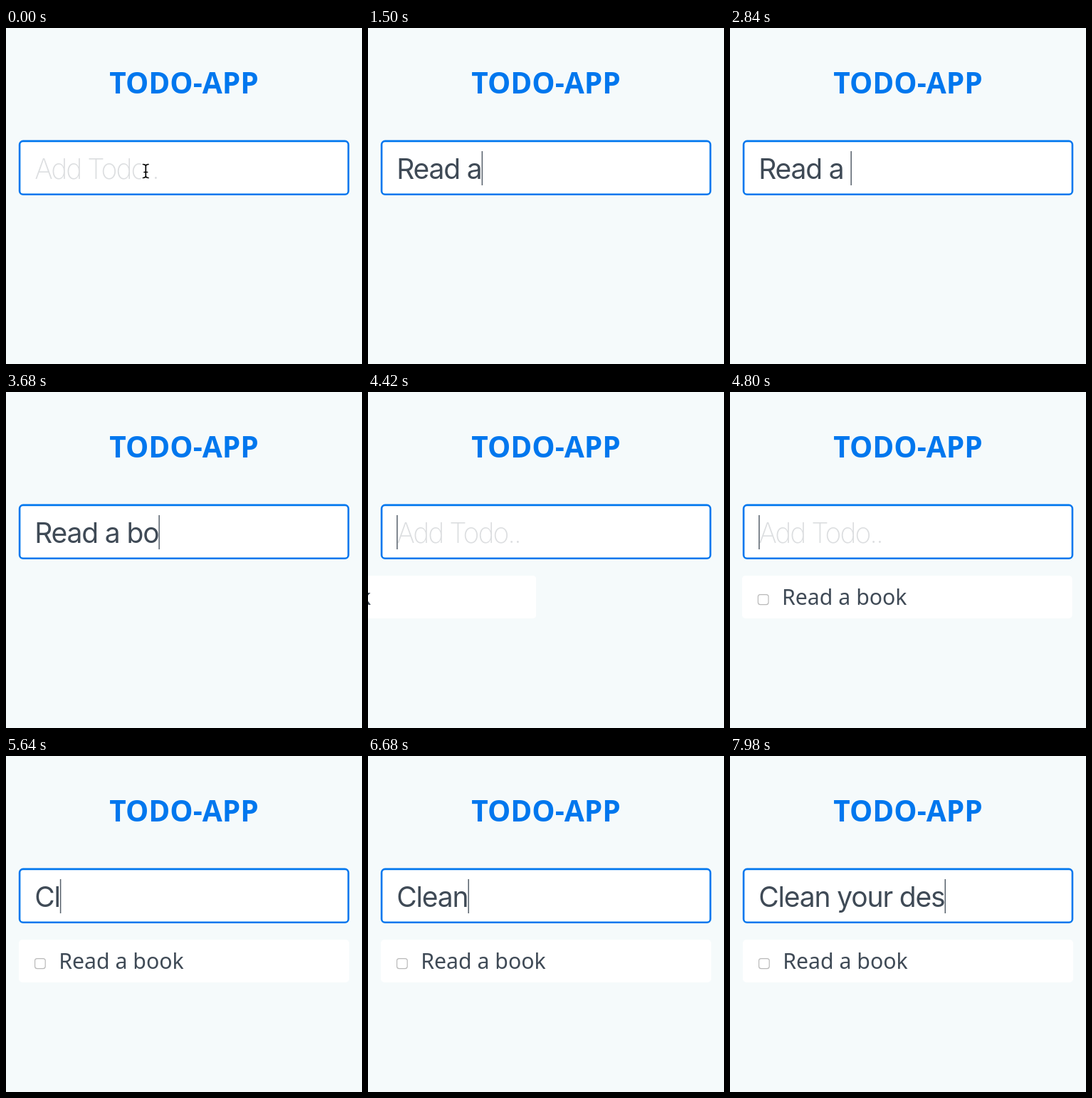
Write an HTML page that moves like this. It is 500x472 px and loops after 8000 ms.

```html
<!DOCTYPE html>
<html lang="en">
<head>
<meta charset="utf-8">
<title>Todo app</title>
<style>
  html, body { margin: 0; width: 100%; height: 100%; overflow: hidden; background: #f5fafb; }
  svg { display: block; width: 500px; height: 472px; }
  .title { font: 700 40.6px "Noto Sans", "Open Sans", sans-serif; fill: #0077ee; text-anchor: middle; }
  .field { fill: #fff; stroke: #0077ee; stroke-width: 2.6; }
  .entry { font: 400 39px Inter, "Liberation Sans", sans-serif; font-optical-sizing: none; }
  #typed { fill: #3f4a56; letter-spacing: -1.15px; }
  #hint { fill: #dcdee0; font-weight: 150; letter-spacing: -2.05px; }
  #caret { fill: #56606b; }
  .label { font: 400 30.25px "Noto Sans", "Open Sans", sans-serif; fill: #3f4a56; }
  .box { fill: #fff; stroke: #b9b9b9; stroke-width: 1.2; }
  .card { animation: slide 8s infinite; }
  .pointer { fill: none; stroke-linecap: round; animation: hide 8s step-end infinite; }
  .halo { stroke: #fff; stroke-width: 6; }
  .beam { stroke: #000; stroke-width: 1.7; }
  @keyframes slide {
    0%, 53% { transform: translateX(-508px); animation-timing-function: ease; }
    60.5%, 100% { transform: translateX(0); }
  }
  @keyframes hide {
    0% { opacity: 1; }
    .75%, 100% { opacity: 0; }
  }
</style>
</head>
<body>
<svg viewBox="0 0 500 472">
  <defs>
    <path id="ibeam" d="M192.5 191.5Q196 191.5 196.3 194Q196.6 191.5 200 191.5M196.3 194V208M192.5 210.5Q196 210.5 196.3 208Q196.6 210.5 200 210.5M194 202.5H198.6"/>
  </defs>
  <text class="title" x="250" y="91.9">TODO-APP</text>
  <rect class="field" x="19.1" y="158.9" width="461.8" height="74.8" rx="4.8"/>
  <text class="entry" id="hint" x="40.2" y="212">Add Todo..</text>
  <text class="entry" id="typed" x="40.2" y="212"></text>
  <rect id="caret" x="40.2" y="173" width="1.5" height="48"/>
  <g class="pointer">
    <use href="#ibeam" class="halo"/>
    <use href="#ibeam" class="beam"/>
  </g>
  <g class="card">
    <rect x="18" y="258" width="464" height="60" rx="5" fill="#fff"/>
    <rect class="box" x="40.6" y="284.6" width="14.6" height="14" rx="3"/>
    <text class="label" x="74.2" y="298.8">Read a book</text>
  </g>
</svg>
<script>
  const LOOP = 8000, ENTER = 4240, LEFT = 40.2;
  const first = {
    text: 'Read a book',
    keys: [360, 520, 680, 920, 1160, 1260, 2540, 3400, 3560, 3720, 3860]
  };
  const second = {
    text: 'Clean your des',
    keys: [5320, 5640, 6000, 6360, 6680, 6860, 7160, 7260, 7360, 7460, 7560, 7680, 7800, 7940]
  };
  const caretOff = [[0, 360], [1740, 2240], [3080, 3400]];

  const [hint, typed, caret] = ['hint', 'typed', 'caret'].map(id => document.getElementById(id));
  const start = performance.now();

  function draw() {
    const t = (performance.now() - start) % LOOP;
    const { text, keys } = t < ENTER ? first : second;
    const count = keys.filter(k => k <= t).length;
    // Hard spaces keep a trailing space in the measured width.
    const value = text.slice(0, count).replace(/ /g, '\u00a0');
    if (typed.textContent !== value) typed.textContent = value;
    hint.style.opacity = count ? 0 : 1;
    caret.setAttribute('x', LEFT + (count ? typed.getComputedTextLength() : 0));
    caret.style.opacity = caretOff.some(([a, b]) => t >= a && t < b) ? 0 : 1;
    requestAnimationFrame(draw);
  }
  draw();
</script>
</body>
</html>
```
